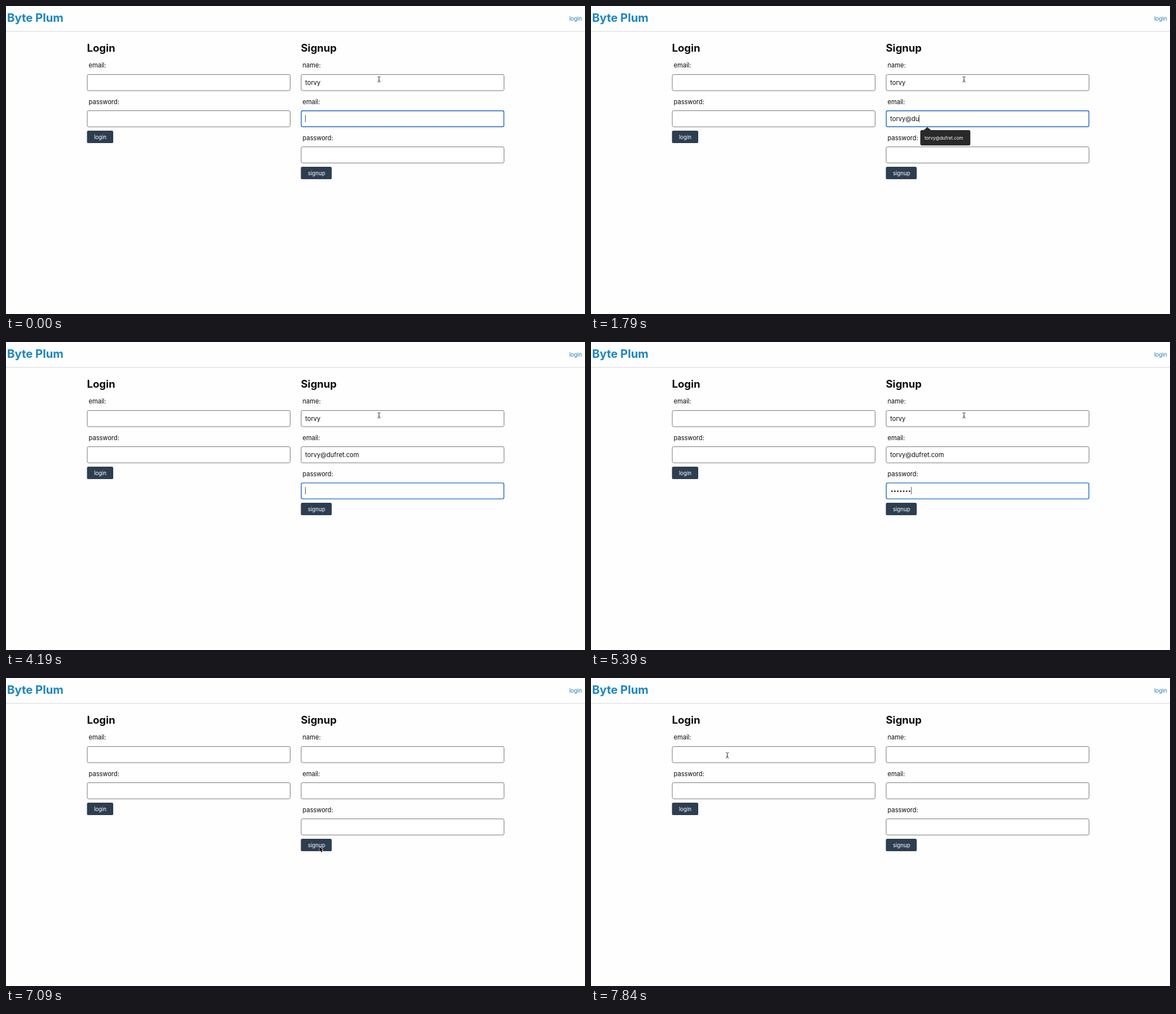
Animation of 1026x546 px, one loop 7.99 s. Source, as an HTML page with a canvas:

```html
<!DOCTYPE html>
<html lang="en">
<head>
<meta charset="utf-8">
<title>Sign-up form</title>
<style>
  html, body { margin: 0; width: 100%; height: 100%; overflow: hidden; background: #fefefe; }
  canvas { display: block; }
</style>
</head>
<body>
<canvas id="stage" width="1026" height="546"></canvas>
<script>
const ctx = document.getElementById('stage').getContext('2d');
const FONT = 'Inter, "Open Sans", sans-serif';
const INK = '#0c0c0c';
const NAME = 'torvy';
const EMAIL = 'torvy@dufret.com';
const LEFT = 143.5, RIGHT = 522.5;
const FIELD = { w: 360.5, h: 29.6 };
const DOT_PITCH = 5.2;

const LOOP = 7990, TICK = 150;
const TIP_AT = 300, TAB_AT = 3140, SUBMIT_AT = 6580, CLEAR_AT = 7090;
const BLINK = 1050, BLINK_ON = 590;

// Bursts of typing: start, letters, duration.
const emailKeys = [[150, 5, 450], [1340, 1, 0], [1640, 2, 150], [2090, 4, 450], [2840, 4, 300]];
const passwordKeys = [[4340, 2, 0], [4640, 3, 300], [5240, 3, 300]];

// Pointer moves along quadratic curves.
const toButton = { start: 5690, duration: 740, points: [[661, 130], [545, 385], [556, 298.5]] };
const toLogin = { start: 7090, duration: 750, points: [[555.5, 299], [500, 310], [241.5, 137]] };

const rowTop = row => 121 + row * 64.1;
const ease = p => p * p * (3 - 2 * p);

// Progress from 0 to 1, held between screen updates.
function progress(t, start, duration) {
  if (t >= start + duration) return 1;
  const steps = Math.round(duration / TICK);
  return Math.max(0, Math.floor((t - start) / duration * steps) / steps);
}

function typed(keys, t) {
  return keys.filter(([start]) => t >= start).reduce((sum, [start, letters, duration]) =>
    sum + Math.round(1 + (letters - 1) * progress(t, start, duration)), 0);
}

// The caret blinks again from the last key press.
function caretShown(t) {
  const ends = [...emailKeys, ...passwordKeys]
    .filter(([start]) => t >= start)
    .map(([start, , duration]) => Math.min(t, start + duration));
  return t < SUBMIT_AT && (t - Math.max(0, ...ends)) % BLINK < BLINK_ON;
}

function pointerAt(t) {
  const { start, duration, points: [a, b, c] } = t < toLogin.start ? toButton : toLogin;
  const p = ease(progress(t, start, duration)), q = 1 - p;
  return a.map((v, i) => q * q * v + 2 * p * q * b[i] + p * p * c[i]);
}

function text(str, x, y, size, color = INK, weight = 400) {
  ctx.font = `${weight} ${size}px ${FONT}`;
  ctx.fillStyle = color;
  ctx.fillText(str, x, y);
  return ctx.measureText(str).width;
}

function box(x, y, w, h, color, r = 2.6) {
  ctx.beginPath();
  ctx.roundRect(x, y, w, h, r);
  ctx.fillStyle = color;
  ctx.fill();
}

function field(x, y, focused) {
  const line = focused ? 1.4 : 1;
  box(x + line / 2, y + line / 2, FIELD.w - line, FIELD.h - line, '#fff');
  ctx.lineWidth = line;
  ctx.strokeStyle = focused ? '#1c68c6' : '#777';
  ctx.stroke();
}

function form(title, labels, x, buttonWidth, focus) {
  text(title, x, 81.3, 18.5, INK, 700);
  labels.forEach((label, row) => {
    text(label, x + 3, rowTop(row) - 11.6, 11.1);
    field(x, rowTop(row), row === focus);
  });
  const y = rowTop(labels.length) - 28.2;
  box(x, y, buttonWidth, 22, '#2c3e50');
  text(title.toLowerCase(), x + 12.4, y + 14.8, 9.7, '#fff');
}

function entries(t) {
  const x = 530.3, dotCount = typed(passwordKeys, t);
  text(NAME, x, rowTop(0) + 18.8, 11.1);
  const width = text(EMAIL.slice(0, typed(emailKeys, t)), x, rowTop(1) + 18.8, 11.1);
  for (let i = 0; i < dotCount; i++) {
    box(x + 1.7 + i * DOT_PITCH, rowTop(2) + 14.1, 2.6, 2.6, INK, 1.3);
  }
  if (caretShown(t)) {
    const onEmail = t < TAB_AT;
    const caretX = x + (onEmail ? width : dotCount * DOT_PITCH);
    ctx.fillStyle = '#555';
    ctx.fillRect(Math.round(caretX), Math.round(rowTop(onEmail ? 1 : 2) + 8), 1, 13);
  }
}

function tooltip() {
  box(583.5, 220, 88.7, 27.3, '#292929', 3);
  ctx.beginPath();
  ctx.moveTo(589, 220.5);
  ctx.lineTo(596, 214.8);
  ctx.lineTo(603, 220.5);
  ctx.fill();
  text(EMAIL, 591, 236.8, 8, '#fff');
}

function beam(x, y) {
  ctx.strokeStyle = '#333';
  ctx.lineWidth = 1;
  ctx.beginPath();
  for (const s of [-1, 1]) {
    ctx.moveTo(x - 2.6, y + s * 4.6);
    ctx.quadraticCurveTo(x, y + s * 4.6, x, y + s * 3.4);
    ctx.quadraticCurveTo(x, y + s * 4.6, x + 2.6, y + s * 4.6);
  }
  ctx.moveTo(x, y - 3.6);
  ctx.lineTo(x, y + 3.6);
  ctx.moveTo(x - 1.3, y + 1.6);
  ctx.lineTo(x + 1.3, y + 1.6);
  ctx.stroke();
}

function arrow(x, y) {
  const outline = [[0, 0], [0, 8.8], [2, 7], [3.4, 10.2], [4.8, 9.6], [3.5, 6.5], [6.2, 6.4]];
  ctx.beginPath();
  outline.forEach(([dx, dy]) => ctx.lineTo(x + dx, y + dy));
  ctx.closePath();
  ctx.lineJoin = 'round';
  ctx.lineWidth = 1.3;
  ctx.strokeStyle = '#fff';
  ctx.stroke();
  ctx.fillStyle = '#000';
  ctx.fill();
}

function overField(x, y) {
  const inside = (left, rows) => x > left && x < left + FIELD.w &&
    rows.some(row => y > rowTop(row) && y < rowTop(row) + FIELD.h);
  return inside(LEFT, [0, 1]) || inside(RIGHT, [0, 1, 2]);
}

function draw(t) {
  ctx.fillStyle = '#fefefe';
  ctx.fillRect(0, 0, 1026, 546);
  ctx.fillStyle = '#d5d5d5';
  ctx.fillRect(0, 44.5, 1026, 1);
  text('Byte Plum', 2, 28, 20.3, '#1a87bd', 700);
  text('login', 998, 26.3, 9.8, '#1a7db2');

  const focus = t < TAB_AT ? 1 : t < SUBMIT_AT ? 2 : -1;
  form('Login', ['email:', 'password:'], LEFT, 46.5, -1);
  form('Signup', ['name:', 'email:', 'password:'], RIGHT, 54.7, focus);
  if (t < CLEAR_AT) entries(t);
  if (t >= TIP_AT && t < TAB_AT) tooltip();

  const [x, y] = pointerAt(t);
  (overField(x, y) ? beam : arrow)(x, y);
}

const begin = performance.now();
function tick() {
  draw((performance.now() - begin) % LOOP);
  requestAnimationFrame(tick);
}
tick();
</script>
</body>
</html>
```
